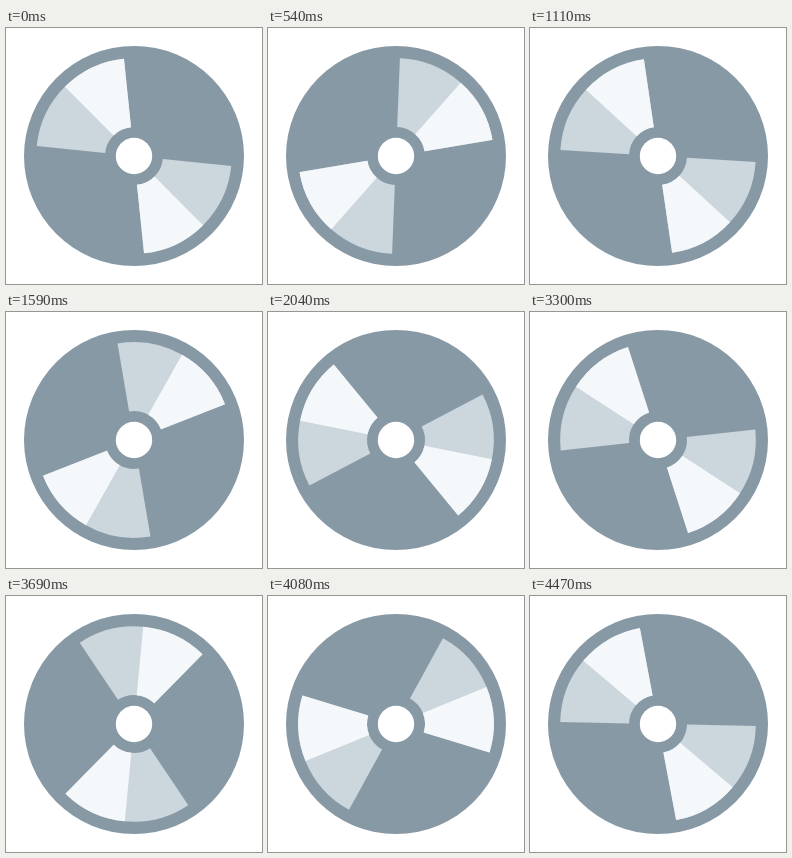
An HTML page that plays this animation: 256x256 px, repeating every 4500 ms.

```html
<!DOCTYPE html>
<html lang="en">
<head>
<meta charset="utf-8">
<title>Spinning disc</title>
<style>
  html, body { margin: 0; height: 100%; overflow: hidden; background: #fff; }
  svg { display: block; width: 100vw; height: 100vh; }
  .shine { fill: none; stroke-width: 68.8; }
</style>
</head>
<body>
<svg viewBox="-128 -128 256 256">
  <circle r="110" fill="#8899a6"/>
  <!-- Each dashed ring yields two opposite wedges; pathLength makes dashes degrees. -->
  <g id="shine">
    <circle class="shine" r="63.4" pathLength="360" stroke="#ccd6dd"
            stroke-dasharray="78.2 101.8" transform="rotate(5.9)"/>
    <circle class="shine" r="63.4" pathLength="360" stroke="#f5f8fa"
            stroke-dasharray="39.1 140.9" transform="rotate(45)"/>
  </g>
  <circle r="18.2" fill="#fff"/>
</svg>
<script>
  const LOOP = 4500, STEP = 30, TURNS = 2;
  const shine = document.getElementById('shine');

  function draw(now) {
    const time = Math.floor(now / STEP) * STEP % LOOP;
    shine.setAttribute('transform', `rotate(${time / LOOP * TURNS * 360})`);
    requestAnimationFrame(draw);
  }
  requestAnimationFrame(draw);
</script>
</body>
</html>
```
